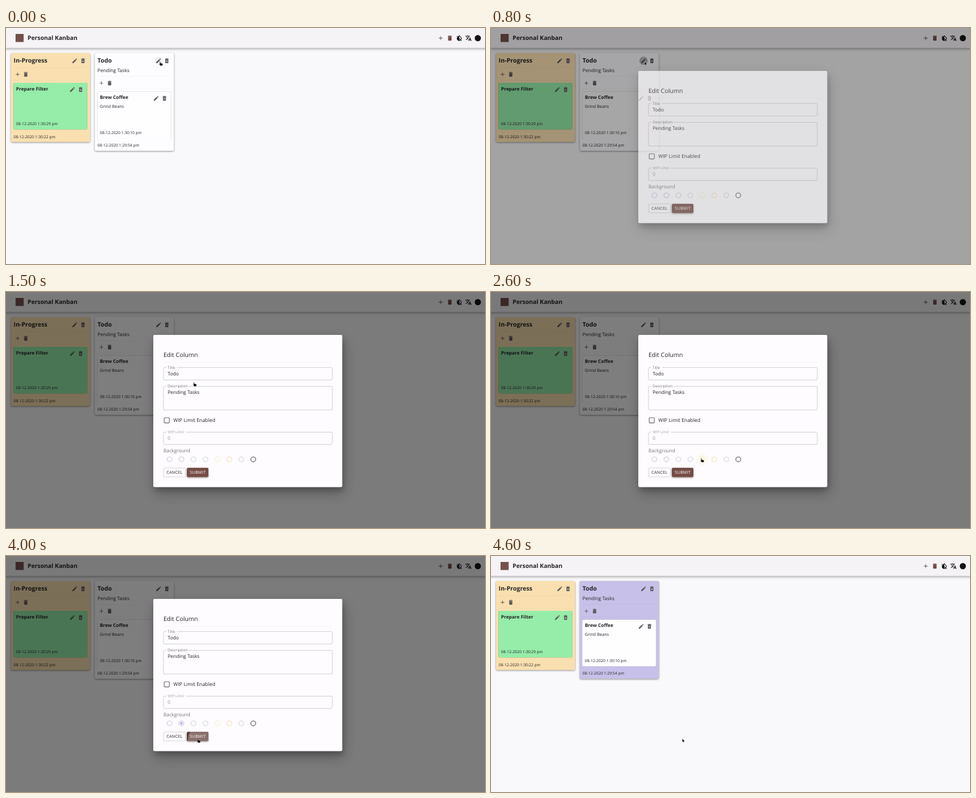
These frames come from a looping animation (800x396 px, 4700 ms). An HTML page:

```html
<!DOCTYPE html>
<html lang="en">
<head>
<meta charset="utf-8">
<title>Personal Kanban</title>
<style>
  html, body { margin: 0; width: 100%; height: 100%; overflow: hidden; background: #f9f8fa; }
  svg { display: block; width: 800px; height: 396px; }
  text { font-family: "Open Sans", "Noto Sans", sans-serif; fill: #252427; text-rendering: geometricPrecision; }
  .bold { font-weight: 700; }
  .button { letter-spacing: .2px; }
  .paper { filter: drop-shadow(0 1px 1.5px rgba(0,0,0,.42)); }
  .card { filter: drop-shadow(0 .6px .7px rgba(0,0,0,.45)); }
  .rule { stroke: #000; stroke-opacity: .06; stroke-width: .6; }
  .field { fill: none; stroke: #c6c4c7; stroke-width: .8; }
  .field.hover { stroke: #333; }
  .sheet { fill: #fefcfe; }
</style>
</head>
<body>
<svg viewBox="0 0 800 396">
  <defs>
    <symbol id="edit" viewBox="0 0 24 24"><path d="M3 17.2V21h3.8l11-11-3.8-3.8zM20.7 7c.4-.4.4-1 0-1.4l-2.3-2.3c-.4-.4-1-.4-1.4 0l-1.8 1.8 3.7 3.7z"/></symbol>
    <symbol id="bin" viewBox="0 0 24 24"><path d="M6 7h12v12a2 2 0 0 1-2 2H8a2 2 0 0 1-2-2zM5 4h3.5l1-1h5l1 1H19v2H5z"/></symbol>
    <symbol id="clear" viewBox="0 0 24 24"><use href="#bin"/><path d="M9 11l6 6m0-6l-6 6" stroke="#fff" stroke-opacity=".85" stroke-width="2"/></symbol>
    <symbol id="add" viewBox="0 0 24 24"><path d="M5 11h6V5h2v6h6v2h-6v6h-2v-6H5z"/></symbol>
    <symbol id="invert" viewBox="0 0 24 24">
      <path d="M12 3.5l5 5a7 7 0 1 1-10 0z" fill="none" stroke="currentColor" stroke-width="2.2"/>
      <path d="M12 4v17a7 7 0 0 1-5-12z"/><path d="M3.5 5L20 21.5" stroke="currentColor" stroke-width="2.2"/>
    </symbol>
    <symbol id="translate" viewBox="0 0 24 24">
      <path d="M1 5h16M9 2v3M5.5 8c2 4 4 6 7 8M14 5c-1 5-5 9-11 13M13 22l4.5-11L22 22M15 18h5.500" fill="none" stroke="currentColor" stroke-width="2.1"/>
    </symbol>
    <filter id="depth" x="-300%" y="-300%" width="700%" height="700%">
      <feDropShadow dy="6" stdDeviation="4" flood-opacity=".2"/>
      <feDropShadow dy="9" stdDeviation="11" flood-opacity=".26"/>
    </filter>
    <clipPath id="submitClip"><rect x="302" y="295" width="36" height="15.500" rx="2"/></clipPath>
  </defs>

  <rect width="800" height="396" fill="#f9f8fa"/>
  <g id="board"></g>
  <rect id="backdrop" width="800" height="396"/>
  <g id="dialog">
    <rect id="sheet" class="sheet" rx="2" filter="url(#depth)"/>
    <g id="form"></g>
  </g>
  <path id="cursor" stroke="#fff" stroke-width=".35"/>
</svg>
<script>
const LOOP = 4700, STEP = 100;
const HAND = 'M0 0l1.200 0 .5 2.400 3 .6.600 1.300-.6 2.500h-3.200l-2.200-2.500.6-.7.700.4z';
const ARROW = 'M0 0v6l1.400-1.200.9 2 .9-.4-.9-1.900h1.900z';
const RADIOS = ['#cdc3e6', '#c9c3dd', '#d5d2e2', '#cdd7dd', '#f6f5c3', '#f8dfb4', '#d8d4de', '#59575c'];
// Pointer stops: time, x, y
const PATH = [
  [0, 256.5, 56.5], [1200, 256.5, 56.5], [1500, 313, 151.5], [1900, 318, 178], [2300, 338, 250],
  [2600, 350.5, 279], [2800, 371, 280], [3000, 336, 280], [3200, 292, 279], [3400, 292, 279],
  [3700, 319.5, 306.5], [4700, 319.5, 306.5]
];

const $ = id => document.getElementById(id);
const set = (el, attrs) => { for (const k in attrs) el.setAttribute(k, attrs[k]); return el; };
const add = (parent, tag, attrs) =>
  parent.appendChild(set(document.createElementNS('http://www.w3.org/2000/svg', tag), attrs));
const box = (parent, x, y, width, height, attrs) =>
  add(parent, 'rect', { x, y, width, height, rx: 2, ...attrs });
const dot = (parent, cx, cy, r, attrs) => add(parent, 'circle', { cx, cy, r, ...attrs });
const rule = (parent, x1, x2, y) => add(parent, 'line', { x1, x2, y1: y, y2: y, class: 'rule' });
const label = (parent, str, x, y, size, attrs) =>
  add(parent, 'text', { x, y, 'font-size': size, ...attrs }).textContent = str;
const icon = (parent, name, cx, cy, size = 10.5, color = '#5c595b') =>
  add(parent, 'use', { href: '#' + name, x: cx - size / 2, y: cy - size / 2, width: size, height: size, fill: color, color });

const bold = { class: 'bold' };
const board = $('board'), form = $('form');

function drawHeader() {
  const bar = box(board, -10, -10, 820, 43.5, { rx: 0, fill: '#f5f3f5' });
  bar.style.filter = 'drop-shadow(0 1.500px 2.500px rgba(0,0,0,.42))';
  box(board, 16, 10, 13.5, 13.5, { rx: 0, fill: '#75504a' });
  label(board, 'Personal Kanban', 36, 20.3, 9.9, bold);
  icon(board, 'add', 726, 17, 11.5);
  icon(board, 'bin', 741.3, 17, 11.5, '#734a44');
  icon(board, 'invert', 757, 17, 11.5, '#161516');
  icon(board, 'translate', 772.3, 17, 11.5, '#161516');
  dot(board, 788, 17, 5.2, { fill: '#161516' });
}

function drawColumn(x, o) {
  const down = o.note ? 14.7 : 0;
  const paper = box(board, x, 42, 132, 149.3 + down, { fill: o.fill, class: 'paper' });
  label(board, o.title, x + 4.5, 58.4, 10.1, bold);
  const halo = dot(board, x + 106.5, 55, 7, { opacity: 0 });
  icon(board, 'edit', x + 106.5, 55);
  icon(board, 'clear', x + 120.3, 55);
  if (o.note) label(board, o.note, x + 4.5, 74.2, 8.1);
  rule(board, x + 4, x + 128, 66.5 + down);
  icon(board, 'add', x + 11, 77.7 + down);
  icon(board, 'bin', x + 24.7, 77.7 + down);
  rule(board, x + 4, x + 128, 87.5 + down);
  box(board, x + 4, 92 + down, 123.5, 78.3, { fill: o.cardFill, class: 'card' });
  label(board, o.card, x + 8.5, 104.5 + down, 7.9, bold);
  if (o.text) label(board, o.text, x + 8.5, 118.8 + down, 7);
  icon(board, 'edit', x + 102.5, 103.3 + down);
  icon(board, 'clear', x + 116.3, 103.3 + down);
  label(board, o.cardDate, x + 8.5, 163 + down, 6.55);
  label(board, o.date, x + 4.5, 184.5 + down, 6.55);
  return { paper, halo };
}

function drawField(title, value, y, height, gap, color = '#252427') {
  const frame = box(form, 263, y, 282, height, { class: 'field' });
  box(form, 267.5, y - 1, gap, 2, { rx: 0, class: 'sheet' });
  label(form, title, 270, y + 2.1, 6.2, { style: `fill:${color === '#252427' ? '#777477' : '#a5a2a5'}` });
  label(form, value, 270, y + 12.9, 8.1, { style: 'fill:' + color });
  return frame;
}

drawHeader();
drawColumn(8.3, {
  title: 'In-Progress', fill: '#fae0b0', card: 'Prepare Filter', cardFill: '#96eca9',
  cardDate: '08-12-2020 1:30:29 pm', date: '08-12-2020 1:30:22 pm'
});
const todo = drawColumn(148.3, {
  title: 'Todo', note: 'Pending Tasks', fill: '#fdfcfe', card: 'Brew Coffee', cardFill: '#fefdff',
  text: 'Grind Beans', cardDate: '08-12-2020 1:30:10 pm', date: '08-12-2020 1:29:54 pm'
});

label(form, 'Edit Column', 263, 108.8, 10.1, { 'font-weight': 500 });
rule(form, 263, 545, 118);
const titleField = drawField('Title', 'Todo', 126.6, 21, 18);
const noteField = drawField('Description', 'Pending Tasks', 158.3, 39.7, 37);
box(form, 264.2, 211, 8.6, 8.6, { rx: 1, fill: 'none', stroke: '#686568', 'stroke-width': 1.1 });
label(form, 'WIP Limit Enabled', 279.5, 218.1, 8.35);
drawField('WIP Limit', '0', 235.2, 20.6, 33, '#99969a');
label(form, 'Background', 263, 269.4, 8, { style: 'fill:#777477' });
const radioX = i => 273 + 20 * i;
const halos = RADIOS.map((stroke, i) => {
  const halo = dot(form, radioX(i), 280.8, 10, { fill: stroke, opacity: 0 });
  dot(form, radioX(i), 280.8, 4.1, { fill: 'none', stroke, 'stroke-width': 1.1 });
  return halo;
});
const pick = dot(form, radioX(1), 280.8, 2.2, { fill: '#bfb6e3' });
box(form, 263.2, 295.2, 36.5, 15, { fill: 'none', stroke: '#c6c4c7', 'stroke-width': .7 });
label(form, 'CANCEL', 268, 305.2, 6.9, { class: 'button' });
const submit = box(form, 302, 295, 36, 15.5, { class: 'paper' });
const ripple = dot(form, 322, 306, 18, { fill: '#fff', opacity: .27, 'clip-path': 'url(#submitClip)' });
label(form, 'SUBMIT', 307, 305.2, 6.9, { class: 'button', style: 'fill:#fff' });

function pointer(t) {
  const i = PATH.findIndex(p => p[0] > t);
  const [t0, x0, y0] = PATH[i - 1], [t1, x1, y1] = PATH[i];
  const s = (t - t0) / (t1 - t0);
  return [x0 + (x1 - x0) * s, y0 + (y1 - y0) * s];
}

function shade(t) {
  const ramp = (from, span) => Math.min(1, Math.max(0, (t - from) / span));
  return t < 4000 ? 1 - (1 - ramp(700, 225)) ** 2 : 1 - ramp(4000, 195) ** 2;
}

function draw(t) {
  const [x, y] = pointer(t), alpha = shade(t);
  const closing = t > 4000, open = t >= 900 && !closing;
  const over = (top, bottom) => open && x > 263 && y > top && y < bottom;

  set(todo.paper, { fill: closing ? '#c7c0e8' : '#fdfcfe' });
  set(todo.halo, { opacity: t < 700 ? .05 : t < 900 ? .27 : 0 });
  set($('backdrop'), { opacity: alpha * .5 });
  set($('dialog'), { opacity: alpha });
  set($('sheet'), closing
    ? { x: 387, y: 179, width: 33.6, height: 42 }
    : { x: 246, y: 72, width: 315.5, height: 255.3 });
  set(form, { visibility: closing ? 'hidden' : 'visible' });

  titleField.classList.toggle('hover', over(126, 148));
  noteField.classList.toggle('hover', over(158, 198));
  halos.forEach((halo, i) =>
    set(halo, { opacity: over(270, 291) && Math.abs(x + 1.5 - radioX(i)) < 10 ? .22 : 0 }));
  set(pick, { visibility: t >= 3300 && !closing ? 'visible' : 'hidden' });
  set(submit, { fill: over(295, 311) && x > 302 ? '#5d3b35' : '#754c46' });
  set(ripple, { visibility: t === 4000 ? 'visible' : 'hidden' });

  set($('cursor'), {
    d: closing || (t >= 700 && t <= 1200) ? ARROW : HAND,
    transform: `translate(${x} ${y})`
  });
}

const start = performance.now();
function tick() {
  const t = (performance.now() - start) % LOOP;
  draw(Math.floor(t / STEP) * STEP);
  requestAnimationFrame(tick);
}
tick();
</script>
</body>
</html>
```
